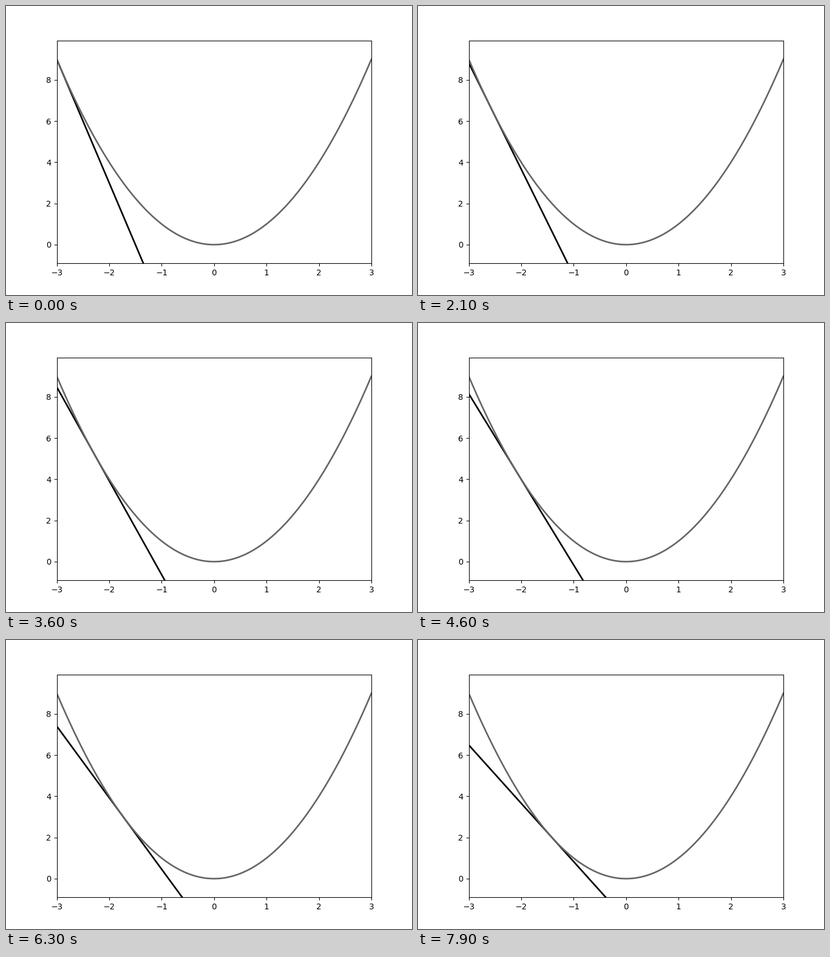
These frames come from a looping animation (700 px wide and 500 px high, 8000 ms). A matplotlib script:

```python
import numpy as np
import matplotlib.pyplot as plt
from matplotlib.animation import FuncAnimation

FRAMES = 80
INTERVAL = 100

xs = np.linspace(-3, 3, 300)

fig, ax = plt.subplots(figsize=(7, 5), dpi=100)
ax.set_xlim(-3, 3)
ax.set_ylim(-0.9, 9.9)

tangent, = ax.plot([], [], color="black", lw=2)
ax.plot(xs, xs**2, color="#666666", lw=2)


def update(i):
    """Draw the tangent to y = x^2 at the i-th sample."""
    a = xs[i]
    ends = xs[[0, -1]]
    tangent.set_data(ends, 2 * a * ends - a**2)
    return tangent,


anim = FuncAnimation(fig, update, frames=FRAMES, interval=INTERVAL,
                     repeat=True, repeat_delay=0, blit=False)
plt.show()
```
